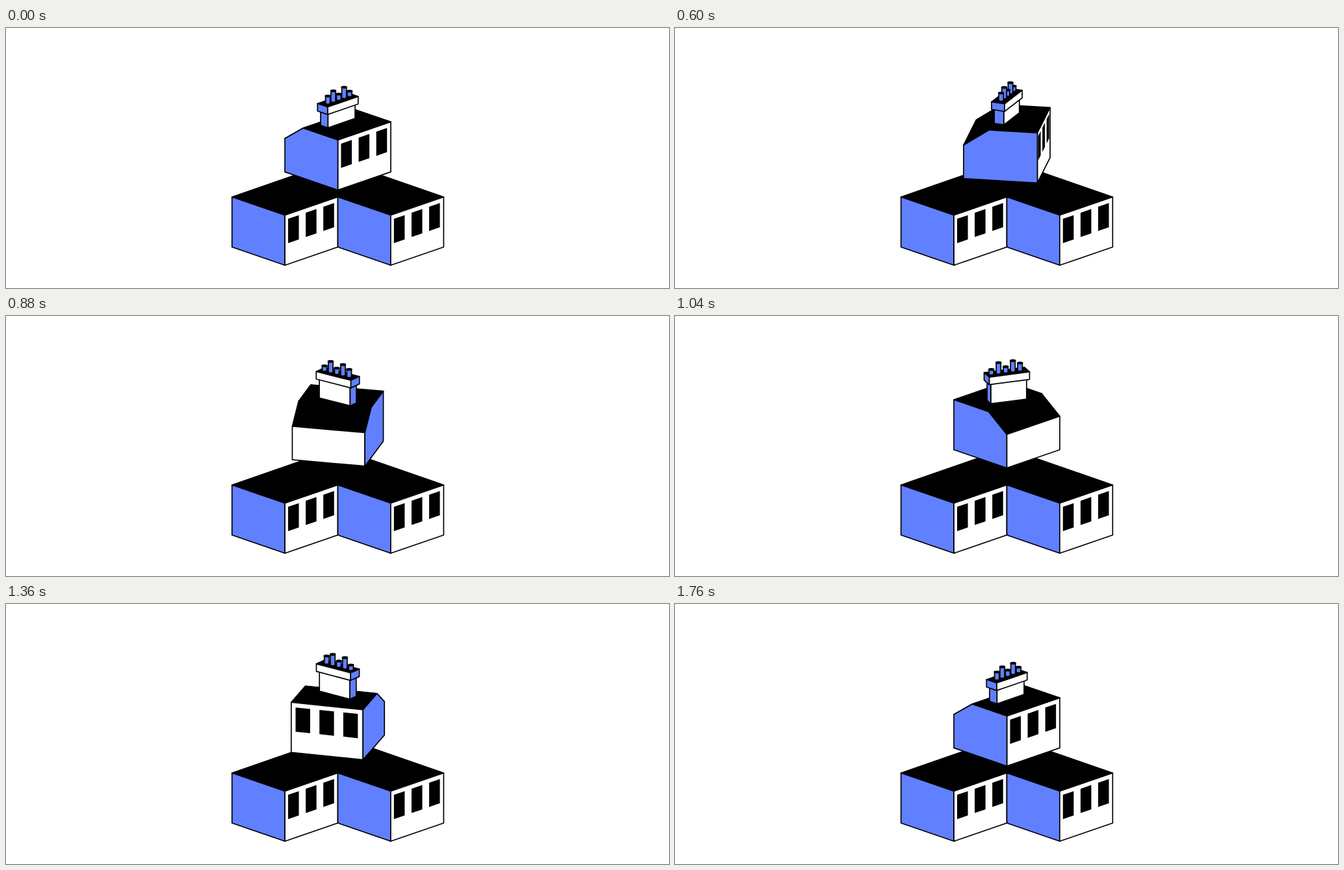
An HTML page without scripts that plays this animation: 1020x400 px, repeating every 2200 ms.

```html
<!DOCTYPE html>
<html lang="en">
<head>
<meta charset="utf-8">
<title>Turning house</title>
<style>
@property --n { syntax: "<number>"; inherits: true; initial-value: 0; }

html, body { margin: 0; width: 100%; height: 100%; overflow: hidden; background: #fff; }
svg { display: block; width: 100vw; height: 100vh; }

path, ellipse { stroke: #000; stroke-width: 1.7; stroke-linejoin: round; vector-effect: non-scaling-stroke; }
.blue { fill: #6080ff; }
.white { fill: #fff; }
.win { stroke: none; }

/* --n counts 40 ms ticks */
@keyframes ticks { from { --n: 0; } to { --n: 55; } }

.lift {
  animation: ticks 2200ms steps(55) -2ms infinite;
  --u: clamp(0, (var(--n) - 8) / 17, 1);
  --d: clamp(0, (var(--n) - 25) / 16, 1);
  --rise: calc(var(--u) * var(--u) * (3 - 2 * var(--u)) - var(--d) * var(--d) * (3 - 2 * var(--d)));
  transform: translate(510.5px, calc(221.4px - 15.8px * var(--rise)));
}

/* turn angle: speed changes linearly between the knots */
.spin {
  --t0: max(0, var(--m) - 7.95);
  --t1: max(0, var(--m) - 15);
  --t2: max(0, var(--m) - 22);
  --t3: max(0, var(--m) - 30);
  --t4: max(0, var(--m) - 34);
  --b: calc((45 + .7085 * var(--t0) * var(--t0) - .3905 * var(--t1) * var(--t1)
    - .2293 * var(--t2) * var(--t2) - .5288 * var(--t3) * var(--t3)
    - .177 * var(--t4) * var(--t4)) * 1deg);
  --c: cos(var(--b));
  --s: sin(var(--b));
}
.house { --m: min(var(--n), 44); }
.chimney { --m: min(44, var(--n) - 1.6 + .2 * max(0, var(--n) - 36)); }

/* upright planes at offset --o, hidden when facing away */
.long {
  transform: matrix(var(--c), calc(-.3436 * var(--s)), 0, 1,
    calc(var(--o) * var(--s)), calc(.3436 * var(--o) * var(--c)));
  opacity: clamp(0, 999 * var(--o) * var(--c), 1);
}
.side {
  transform: matrix(var(--s), calc(.3436 * var(--c)), 0, 1,
    calc(var(--o) * var(--c)), calc(-.3436 * var(--o) * var(--s)));
  opacity: clamp(0, -999 * var(--o) * var(--s), 1);
}
.flat {
  transform: matrix(var(--c), calc(-.3436 * var(--s)), var(--s), calc(.3436 * var(--c)),
    0, calc(-1 * var(--h)));
}
.slope {
  transform: matrix(var(--c), calc(-.3436 * var(--s)), calc(-39.6 * var(--s)), calc(25.5 - 13.6 * var(--c)),
    calc(-18 * var(--s)), calc(-6.18 * var(--c) - 77));
}

.cap {
  --u: clamp(0, (var(--n) - 14) / 11, 1);
  --d: clamp(0, (var(--n) - 33) / 8, 1);
  --rise: calc(var(--u) * var(--u) * (3 - 2 * var(--u)) - var(--d) * var(--d) * (3 - 2 * var(--d)));
  transform: translate(0px, calc(-22px - 8.7px * var(--rise)));
}
.pots use {
  transform: translate(calc(1px * var(--p) * var(--c)), calc(-11.6px - .3436px * var(--p) * var(--s)));
}
.ahead { opacity: clamp(0, 999 * var(--s), 1); }
.back { opacity: clamp(0, -999 * var(--s), 1); }
.p1 { --p: -21.7; }
.p2 { --p: -9.9; }
.p3 { --p: 1.9; }
.p4 { --p: 13.7; }
.p5 { --p: 25.5; }
</style>
</head>
<body>
<svg viewBox="0 0 1020 400" xmlns="http://www.w3.org/2000/svg">
  <defs>
    <path id="wall" d="M-57.6 0V-77H57.6V0z"/>
    <path id="wins" class="win" d="M-50.6-69.7h23.4v37.3h-23.4zM-12.3-69.7h23.4v37.3h-23.4zM26-69.7h23.4v37.3H26z"/>
    <path id="gable" d="M57.6 0V-77H-18L-57.6-51.5V0z"/>
    <path id="capLong" d="M-33.2 0V-11.6H33.2V0z"/>
    <path id="capSide" d="M-11 0V-11.6H11V0z"/>
    <path id="bodyLong" d="M-29.5 0V-32H29.5V0z"/>
    <path id="bodySide" d="M-8 0V-32H8V0z"/>
    <ellipse id="lid" rx="4" ry="1.3" stroke-width="1.2"/>
    <g id="pot1"><path class="blue" d="M-3.6 0V-11.5H3.6V0Q0 2.4-3.6 0z"/><use href="#lid" y="-11.5"/></g>
    <g id="pot2"><path class="blue" d="M-3.6 0V-16.5H3.6V0Q0 2.4-3.6 0z"/><use href="#lid" y="-16.5"/></g>
    <g id="pot3"><path class="blue" d="M-3.6 0V-8.7H3.6V0Q0 2.4-3.6 0z"/><use href="#lid" y="-8.7"/></g>
    <g id="pot4"><path class="blue" d="M-3.6 0V-16.4H3.6V0Q0 2.4-3.6 0z"/><use href="#lid" y="-16.4"/></g>
    <g id="pot5"><path class="blue" d="M-3.6 0V-7.4H3.6V0Q0 2.4-3.6 0z"/><use href="#lid" y="-7.4"/></g>
    <g id="block">
      <use href="#wall" class="blue" transform="matrix(.707 .243 0 1 388.4 351)"/>
      <g transform="matrix(.707 -.243 0 1 469.8 351)">
        <use href="#wall" class="white"/>
        <use href="#wins"/>
      </g>
    </g>
  </defs>

  <path d="M347.6 260L510.5 203.5L673.4 260L592 288L510.5 260L429.1 288z"/>
  <use href="#block"/>
  <use href="#block" x="162.8"/>

  <g class="lift">
    <g class="spin house">
      <path class="slope" d="M-57.6 0H57.6V1H-57.6z"/>
      <path class="flat" style="--h:77" d="M-57.6-18H57.6V57.6H-57.6z"/>
      <g class="long" style="--o:-57.6"><path class="white" d="M-57.6 0V-51.5H57.6V0z"/></g>
      <g class="long" style="--o:57.6">
        <use href="#wall" class="white"/>
        <use href="#wins"/>
      </g>
      <g class="side" style="--o:-57.6"><use href="#gable" class="blue"/></g>
      <g class="side" style="--o:57.6"><use href="#gable" class="blue"/></g>
    </g>

    <g class="spin chimney">
      <g transform="translate(0 -77)">
        <g class="long" style="--o:-8"><use href="#bodyLong" class="white"/></g>
        <g class="long" style="--o:8"><use href="#bodyLong" class="white"/></g>
        <g class="side" style="--o:-29.5"><use href="#bodySide" class="blue"/></g>
        <g class="side" style="--o:29.5"><use href="#bodySide" class="blue"/></g>
        <g class="cap">
          <path class="flat" style="--h:11.6" d="M-33.2-11H33.2V11H-33.2z"/>
          <g class="long" style="--o:-11"><use href="#capLong" class="white"/></g>
          <g class="long" style="--o:11"><use href="#capLong" class="white"/></g>
          <g class="side" style="--o:-33.2"><use href="#capSide" class="blue"/></g>
          <g class="side" style="--o:33.2"><use href="#capSide" class="blue"/></g>
          <g class="pots ahead">
            <use href="#pot5" class="p5"/>
            <use href="#pot4" class="p4"/>
            <use href="#pot3" class="p3"/>
            <use href="#pot2" class="p2"/>
            <use href="#pot1" class="p1"/>
          </g>
          <g class="pots back">
            <use href="#pot1" class="p1"/>
            <use href="#pot2" class="p2"/>
            <use href="#pot3" class="p3"/>
            <use href="#pot4" class="p4"/>
            <use href="#pot5" class="p5"/>
          </g>
        </g>
      </g>
    </g>
  </g>
</svg>
</body>
</html>
```
